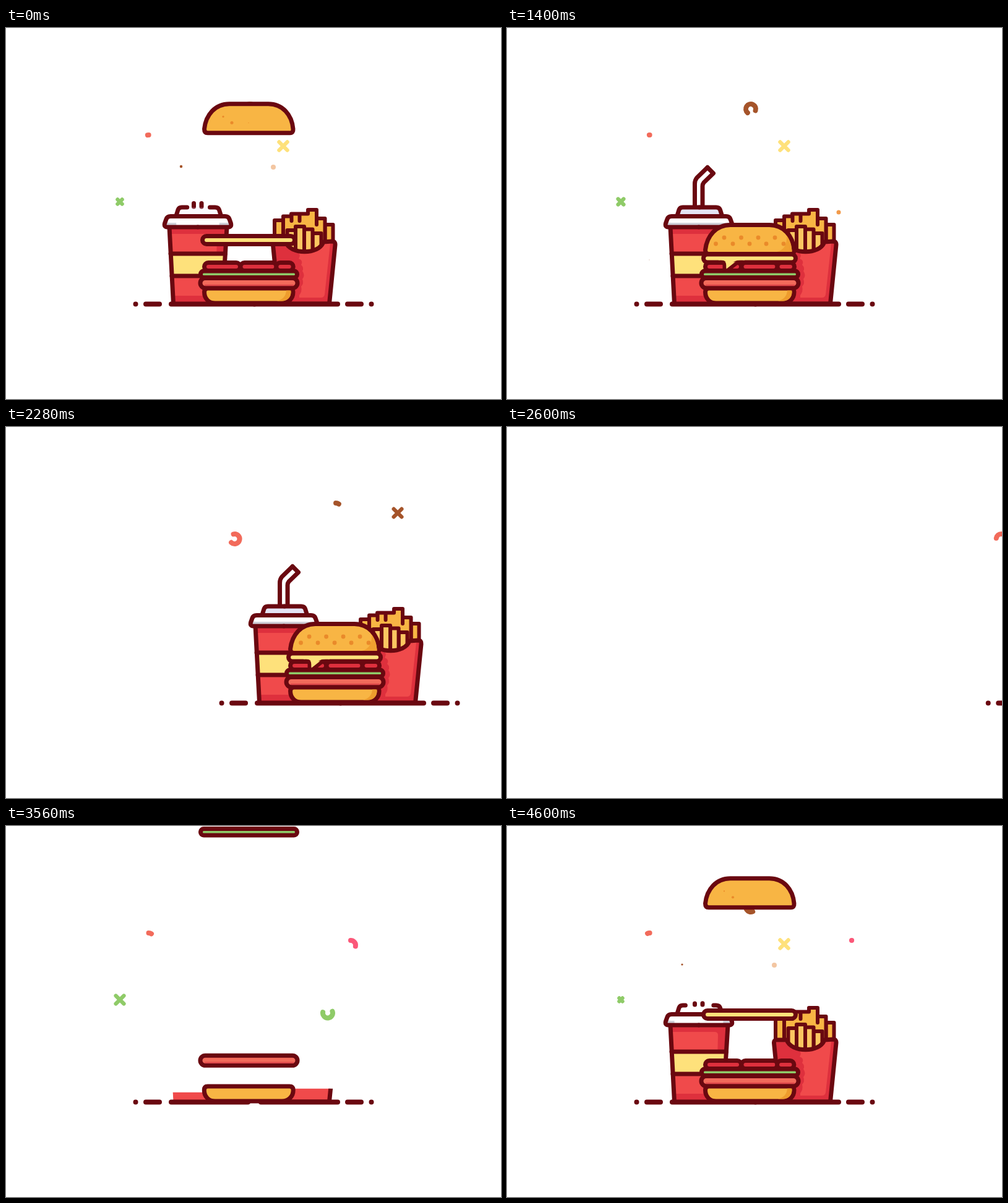
These frames come from a looping animation (800 px wide and 600 px high, 4640 ms). An HTML page:

```html
<!DOCTYPE html>
<html lang="en">
<head>
<meta charset="utf-8">
<title>Burger menu</title>
<style>
  html, body { margin: 0; width: 100%; height: 100%; overflow: hidden; background: #fff; }
  svg { display: block; width: 100%; height: 100%; }
  path, rect { stroke-linejoin: round; stroke-linecap: round; }
  .ink { stroke: #6a0810; stroke-width: 7; }
  .line { fill: none; }
  .fry { stroke-width: 6; fill: #f8b544; }
  .front { fill: #fcc661; }
  .red { fill: #f04a4b; }
  .shade { fill: #de303d; }
  .ground { stroke-width: 8; }
  .grey { fill: none; stroke: #cfd0d8; stroke-width: 4; stroke-linecap: butt; }
</style>
</head>
<body>
<svg viewBox="0 0 800 600">
  <defs>
    <clipPath id="cupClip"><rect id="cupReveal" x="255" width="110" height="130"/></clipPath>
    <clipPath id="boxClip"><rect id="boxReveal" x="420" width="120" height="115"/></clipPath>
  </defs>
  <g id="scene">
    <g id="confetti"></g>

    <g id="fries">
      <path class="ink fry" data-rise="3870 40" d="M434 352V311H448V352Z"/>
      <path class="ink fry" data-rise="4010 40" d="M515.5 352V318H528.5V352Z"/>
      <path class="ink fry" data-rise="3800 70" d="M448 375V304.5H461V300.5H488V294H502V308H515.5V375ZM461.5 301V312M474.5 301V312M502 308V318"/>
      <path class="ink fry front" data-rise="3870 45" d="M454.5 372V327H468V372Z"/>
      <path class="ink fry front" data-rise="4050 45" d="M495.5 372V332H509.5V372Z"/>
      <path class="ink fry front" data-rise="4000 45" d="M482 372V325.5H495.5V372Z"/>
      <path class="ink fry front" data-rise="3922 45" d="M468 372V321H482V372Z"/>
    </g>

    <g id="box" clip-path="url(#boxClip)">
      <path class="red" d="M452 346H436Q431 346 431.5 351L441 446H522.5L532 351Q532.5 345 527 345L513 346C506 367 459 367 452 346Z"/>
      <g data-fade="4150 200">
        <path class="shade" d="M435 350H454Q462 360 472 362q5 6 1 11q8 3 4 10q5 5 2 10q5 7 0 13q3 7-2 12q2 8-3 14V442H441Z"/>
        <path class="shade" d="M524 349L530 348L521 442H474V436H509Q514 436 515 431Z"/>
      </g>
      <path id="flaps" fill="#f9a3ad" d="M435 349H450L435 360ZM529 349H516L528 360Z"/>
      <path class="ink line" d="M452 346H436Q431 346 431.5 351L441 446H522.5L532 351Q532.5 345 527 345L513 346C506 367 459 367 452 346Z"/>
    </g>

    <g clip-path="url(#cupClip)">
      <path class="red" d="M264 322H357L349.5 446H270.5Z"/>
      <path class="shade" data-fade="4150 250" d="M264 322H357L349.5 446H270.5L270 433H330Q338 433 339 425L341 338Q341 333 335 333H265Z"/>
      <path fill="#fee17b" d="M266 365H355L352.5 401H268Z"/>
    </g>
    <path class="ink line" data-trim="3585 600" pathLength="1" d="M270.5 446L264 322"/>
    <path class="ink line" data-trim="3585 600" pathLength="1" d="M349.5 446L357 322"/>
    <path class="ink line" data-trim="3800 130" pathLength="1" d="M352.5 401H268"/>
    <path class="ink line" data-trim="3929 130" pathLength="1" d="M354.5 365H266"/>

    <path class="ink line" data-trim="4540 600 smooth" pathLength="1" d="M303.5 289V252Q303.5 246 307 242L324 225.5"/>
    <path class="ink line" data-trim="4540 600 smooth" pathLength="1" d="M316 289V256Q316 252.5 318 250L333.5 235L324 225.5"/>

    <path fill="#e4e3f4" data-fade="4610 150" d="M275.5 303L278 294Q279.5 290 284 290H338Q343 290 344.5 294L347 303Z"/>
    <path class="ink line" data-trim="4450 550 out" pathLength="1" d="M275.5 302L278 294Q279.5 290 284 290H311"/>
    <path class="ink line" data-trim="4450 550 out" pathLength="1" d="M347 302L344.5 294Q343 290 338 290H311"/>
    <path fill="#fff" data-fade="4280 40" d="M266 304H354L364 322H256Z"/>
    <path class="grey" data-trim="4500 450" pathLength="1" d="M259 317H311"/>
    <path class="grey" data-trim="4500 450" pathLength="1" d="M361 317H309"/>
    <path class="ink line rim" pathLength="1" d="M310 322H261Q255 322 256.5 316L259 309Q260.5 304.5 266 304.5H310"/>
    <path class="ink line rim" pathLength="1" d="M310 322H359Q365 322 363.5 316L361 309Q359.5 304.5 354 304.5H310"/>

    <g id="ground" class="ink ground">
      <path id="lineLeft"/><path id="lineRight"/><path id="dashLeft"/><path id="dashRight"/>
    </g>

    <g data-land="3473">
      <path class="ink" fill="#f8b544" d="M326 421H458Q464 421 464 427C464 438 456 445 446 445H338C328 445 320.5 438 320.5 427Q320.5 421 326 421Z"/>
      <path fill="#ee9c2d" data-fade="3600 200" d="M460.5 424.5Q461 441 445 441.5H438Q452 438 453 424.5Z"/>
    </g>
    <g data-land="3596">
      <rect class="ink" fill="#f26b5b" x="314" y="404.5" width="157" height="16" rx="8"/>
      <path stroke="#e04a4b" stroke-width="2.5" d="M322 416H464"/>
    </g>
    <g data-land="3970"><rect class="ink" fill="#8fcb68" x="314.5" y="393" width="156" height="10.5" rx="5"/></g>
    <g data-land="4075"><rect class="ink shade" x="320.5" y="379.5" width="58" height="13" rx="6.5"/></g>
    <g data-land="4271"><rect class="ink shade" x="379" y="379.5" width="58" height="13" rx="6.5"/></g>
    <g data-land="4407"><rect class="ink shade" x="437" y="379.5" width="27.5" height="13" rx="6.5"/></g>
    <g data-land="4847">
      <path class="ink" fill="#f8b544" d="M326 365.5H459Q464.5 365.5 464 359C462 336 447 318.5 424 318.5H361C338 318.5 323 336 320.5 359Q320.5 365.5 326 365.5Z"/>
      <path fill="#f0a030" data-fade="4900 200" d="M452 336Q460 346 460.5 362H436Q453 358 452 336Z"/>
      <g id="seeds" fill="#ea8a2a"></g>
    </g>
    <g data-land="4672">
      <rect class="ink" fill="#fee17b" x="317.5" y="366" width="149" height="13" rx="6.5"/>
      <g id="drip">
        <path class="ink" fill="#fee17b" style="stroke-width:6" d="M345 378.5Q351.5 378.5 351.5 384V393H355L369 382Q373 378.5 380 378.5"/>
        <path fill="#fee17b" d="M342 371H384V375.5H376Q369 375.5 364 380L354.5 388V382Q354 375.5 347 375.5H342Z"/>
      </g>
    </g>
  </g>
</svg>
<script>
const LOOP = 4640, BUILD = 2760;
const $ = id => document.getElementById(id);
const all = sel => [...document.querySelectorAll(sel)];
const clamp = x => Math.min(1, Math.max(0, x));
const ease = {
  linear: x => x,
  smooth: x => x * x * (3 - 2 * x),
  out: x => 1 - (1 - x) ** 2
};
const make = (name, parent) =>
  parent.appendChild(document.createElementNS('http://www.w3.org/2000/svg', name));
const cue = key => all(`[data-${key}]`).map(el => [el, ...el.dataset[key].split(' ')]);

const trims = cue('trim'), fades = cue('fade'), rises = cue('rise'), lands = cue('land');
const rims = all('.rim');
const lowSeeds = [365, 392, 337.5, 419, 447];
const seeds = [365, 351, 392, 378.5, 337.5, 419, 406, 447, 433].map((x, i) => {
  const el = make('circle', $('seeds'));
  el.setAttribute('cx', x);
  el.setAttribute('cy', lowSeeds.includes(x) ? 349 : 339);
  return { el, start: 4440 + i * 75 };
});

const CORAL = '#f26b5b', BROWN = '#a5542a', YELLOW = '#fee17b', GREEN = '#8fcb68', PINK = '#fb5879';
// kind, x, y, colour, start times, dot radius, dot life
const pieces = [
  ['arc', 230.5, 181, CORAL, [155, 1525, 3425]],
  ['arc', 394, 131, BROWN, [770, 2140, 4040]],
  ['arc', 557, 193, PINK, [3315]],
  ['arc', 520, 302.5, GREEN, [3115]],
  ['cross', 448, 191, YELLOW, [950, 2320, 4230]],
  ['cross', 184, 281, GREEN, [1190, 3090, 4460]],
  ['cross', 494, 139, BROWN, [600, 1970, 3880]],
  ['dot', 432, 225, '#f3c6a2', [3990], 4, 1000],
  ['dot', 283, 224, BROWN, [4500], 3.2, 700],
  ['dot', 478, 279, BROWN, [610], 4, 700],
  ['dot', 508, 304, CORAL, [450], 4, 500],
  ['dot', 536, 298, '#f29a4a', [1100], 3.5, 600],
  ['dot', 230, 375, BROWN, [1385], 4, 600],
  ['dot', 406, 167, PINK, [3700], 3.5, 600]
].flatMap(([kind, x, y, color, starts, r, life]) => starts.map(s => {
  const el = make('path', $('confetti'));
  el.setAttribute('fill', 'none');
  el.setAttribute('stroke', color);
  return { el, kind, x, y, r, life, start: s < BUILD ? s + LOOP : s };
}));

// Each kind returns [path, stroke width] for its age.
const draw = {
  arc({ x, y }, age) {
    if (age > 1295) return;
    const turn = a => ease.smooth(clamp(a / 1050)) * 720 - 90;
    const tail = turn(age - 245), head = turn(age) + 1;
    const at = deg => {
      const a = deg * Math.PI / 180;
      return `${x + 8 * Math.cos(a)} ${y + 8 * Math.sin(a)}`;
    };
    return [`M${at(tail)}A8 8 0 ${+(head - tail > 180)} 1 ${at(head)}`, 8];
  },
  cross({ x, y }, age) {
    if (age > 700) return;
    const a = 6.2 * ease.smooth(clamp(Math.min(age / 350, (700 - age) / 250))) + .4;
    const w = 6.2 * clamp(Math.min(age, 700 - age) / 50);
    return [`M${x - a} ${y - a}l${2 * a} ${2 * a}M${x - a} ${y + a}l${2 * a} ${-2 * a}`, w];
  },
  dot({ x, y, r, life }, age) {
    if (age > life) return;
    return [`M${x} ${y}h.01`, 2 * r * clamp(Math.min(age, life - age) / 200)];
  }
};

function show(el, visible) {
  el.style.visibility = visible ? '' : 'hidden';
  return visible;
}

function render(now) {
  const t = now % LOOP;
  const T = t < BUILD ? t + LOOP : t; // one pass: build, rest, slide out
  const part = (start, length, curve = 'linear') => ease[curve](clamp((T - start) / length));

  $('scene').setAttribute('transform', `translate(${650 * part(LOOP + 2082, 667, 'smooth')})`);

  for (const p of pieces) {
    const age = T - p.start;
    const shape = age > 0 && draw[p.kind](p, age);
    if (show(p.el, !!shape)) {
      p.el.setAttribute('d', shape[0]);
      p.el.setAttribute('stroke-width', shape[1]);
    }
  }

  const q = part(2820, 620) - 1;
  const spread = 1 + 2 * q ** 3 + q * q;
  const grow = 134.5 * part(3100, 500);
  show($('ground'), T > 2820);
  show($('lineLeft'), grow > 0);
  show($('lineRight'), grow > 0);
  $('lineLeft').setAttribute('d', `M267 446.5h${grow}`);
  $('lineRight').setAttribute('d', `M536 446.5h${-grow}`);
  const dash = side => {
    const x = d => 400 + side * d * spread;
    return `M${x(190.5)} 446.5h.01M${x(174)} 446.5L${x(152)} 446.5`;
  };
  $('dashLeft').setAttribute('d', dash(-1));
  $('dashRight').setAttribute('d', dash(1));

  $('cupReveal').setAttribute('y', 446 - 124 * part(3487, 600));
  show($('box'), T > 3450);
  $('boxReveal').setAttribute('y', 452 - 114 * part(3450, 350, 'smooth'));
  $('flaps').setAttribute('opacity', 1 - part(4000, 100));

  for (const [el, start, length, curve] of trims) {
    const k = part(+start, +length, curve);
    if (show(el, k > 0)) el.setAttribute('stroke-dasharray', `${k} 2`);
  }
  // The rim grows outwards from the middle of its lower and upper edge.
  const lower = part(3950, 340, 'smooth') / 2 + .02;
  const upper = part(3990, 300, 'smooth') / 2 + .02;
  for (const el of rims) {
    show(el, T > 3950);
    el.setAttribute('stroke-dasharray',
      lower + upper < 1 ? `${lower} ${1 - lower - upper} ${upper} 2` : 'none');
  }
  for (const [el, start, length] of fades) el.setAttribute('opacity', part(+start, +length));
  for (const [el, start, depth] of rises) {
    show(el, T > +start);
    el.setAttribute('transform', `translate(0 ${depth * (1 - part(+start, 300, 'out'))})`);
  }
  for (const [el, land] of lands) {
    const d = T - land;
    const stretch = d > 0 ? .09 * Math.exp(-d / 80) * Math.cos(d / 60) : 0;
    el.setAttribute('transform',
      `translate(392 ${Math.min(0, d * .95)}) scale(${1 + stretch} 1) translate(-392)`);
  }
  for (const { el, start } of seeds) el.setAttribute('r', 3.4 * part(start, 270));

  const drip = part(4690, 250, 'out');
  show($('drip'), drip > 0);
  $('drip').setAttribute('transform', `translate(0 ${377 * (1 - drip)}) scale(1 ${drip})`);
}

const begin = performance.now();
function frame() {
  render(performance.now() - begin);
  requestAnimationFrame(frame);
}
frame();
</script>
</body>
</html>
```
